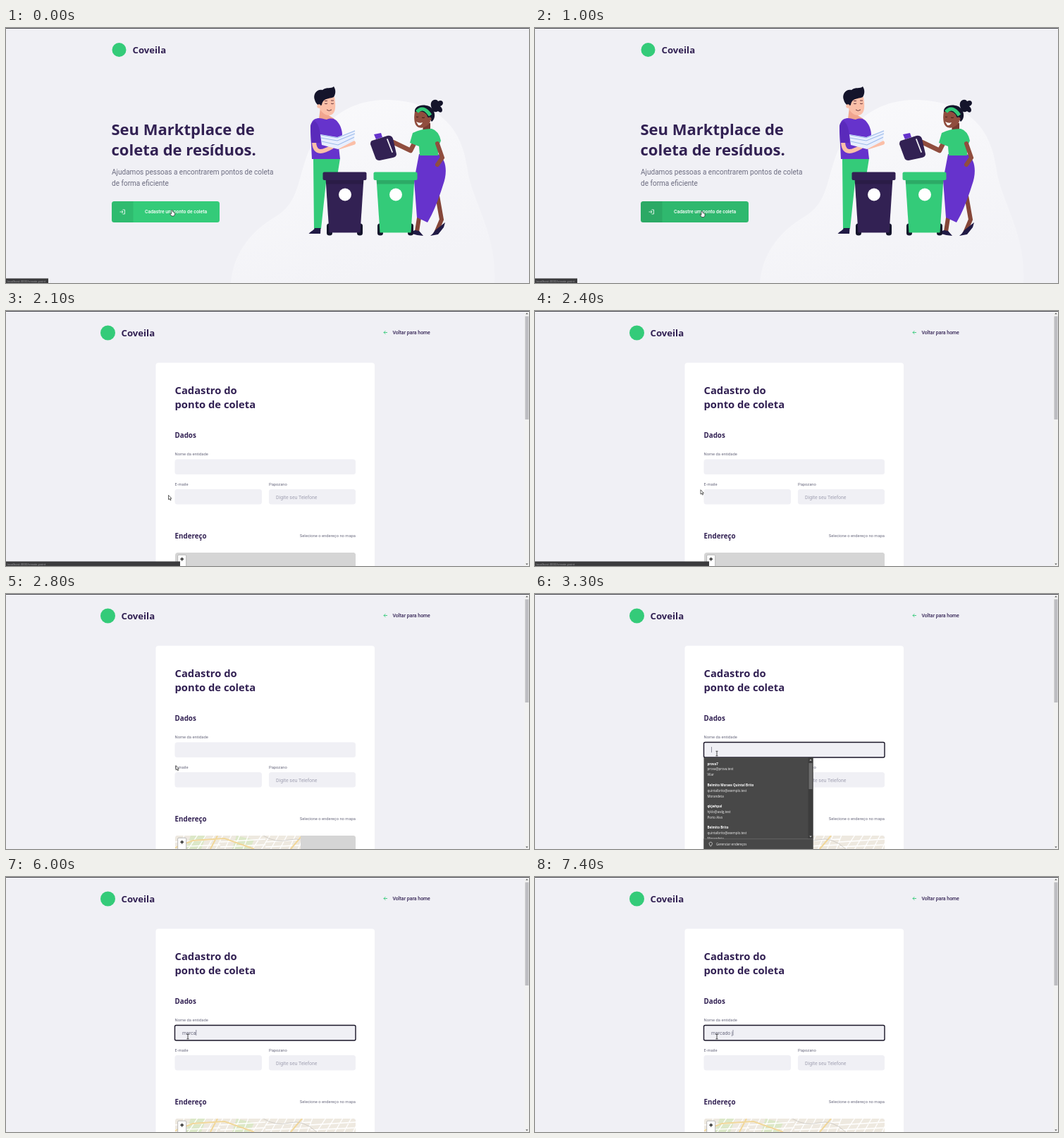
These frames come from a looping animation (742x362 px, 8 s). An HTML page:

```html
<!DOCTYPE html>
<html lang="pt">
<head>
<meta charset="utf-8">
<title>Cadastro</title>
<style>
html, body { margin: 0; width: 100%; height: 100%; overflow: hidden; background: #f0f0f5; }
svg { display: block; width: 100vw; height: 100vh; }
text { font-family: Roboto, sans-serif; fill: #6c6c80; white-space: pre; }
.h { font-family: "Open Sans", sans-serif; font-weight: 700; fill: #322153; }
.logo { font-size: 13.2px; }
.big { font-size: 22px; }
.mid { font-size: 14.75px; }
.sub { font-size: 9.8px; }
.lead { font-size: 10.04px; }
.label { font-size: 5.8px; }
.field { font-size: 6.9px; }
.med { font-weight: 500; }
.tiny text { font-family: "Open Sans", sans-serif; font-size: 4.5px; fill: #f2f2f2; }
.tiny .name { font-weight: 700; fill: #fff; }
</style>
</head>
<body>
<svg viewBox="0 0 742 362" preserveAspectRatio="none">
  <defs>
    <linearGradient id="fade" x1="0" y1="0" x2="0.4" y2="1">
      <stop offset="0" stop-color="#fafafc"/><stop offset="1" stop-color="#f3f3f7"/>
    </linearGradient>
    <clipPath id="mapBox"><path d="M240 362V347q0-4 4-4H492q4 0 4 4V362Z"/></clipPath>
    <g id="wheels" fill="#14142b">
      <rect x="5.5" y="73" width="8" height="17" rx="3.5"/><rect x="48.5" y="73" width="8" height="17" rx="3.5"/>
    </g>
    <g id="bin">
      <path d="M4 9H58L53 86H9Z"/>
      <path d="M4 11H58L57.5 17H4.5Z" fill="#000" opacity=".16"/>
      <rect width="62" height="11.5" rx="2"/>
      <circle cx="31.5" cy="32" r="9" fill="#fff"/>
    </g>
  </defs>
  <rect width="742" height="362" fill="#f0f0f5"/>

  <g id="home">
    <path d="M319 362C322 322 345 290 382 268C414 248 412 224 426 184C446 128 492 100 544 102C614 105 646 142 654 196C660 246 697 290 693 362Z" fill="url(#fade)"/>
    <circle cx="160.5" cy="31" r="10" fill="#34cb79"/>
    <text class="h logo" x="179.5" y="35.5">Coveila</text>
    <text class="h big" x="149.5" y="152">Seu Marktplace de</text>
    <text class="h big" x="149.5" y="181">coleta de resíduos.</text>
    <text class="lead" x="150" y="208">Ajudamos pessoas a encontrarem pontos de coleta</text>
    <text class="lead" x="150" y="224">de forma eficiente</text>
    <rect id="button" x="150" y="246" width="153" height="30" rx="3.5"/>
    <path d="M180.500 246H153.500q-3.500 0-3.500 3.500V272.500q0 3.500 3.500 3.500H180.500Z" opacity=".08"/>
    <path d="M165.500 258H168.500V264H165.500M161.500 261H166M164.300 259.200L166.200 261L164.300 262.800" fill="none" stroke="#fff" stroke-width=".8"/>
    <text class="med" x="197" y="263.300" style="font-size:6.85px;fill:#fff">Cadastre um ponto de coleta</text>

    <!-- man -->
    <path d="M436 185H474L470 210H455L447 285H437Z" fill="#34cb79"/>
    <path d="M429.500 292C433 288 437 287 438 284H446.500L446 292Z" fill="#201a45"/>
    <path d="M446 113H458V124L466 129L455 134L444 129Z" fill="#f0a58e"/>
    <path d="M444 100L466 98C468 110 468 120 462 123C455 126 448 121 445 114Z" fill="#fbbfa8"/>
    <path d="M438 102C435 94 441 86 449 88C455 83 461 87 465 83C469 89 467 95 465 98C458 101 450 99 448 109L445 112C441 108 439 106 438 102Z" fill="#14142b"/>
    <circle cx="444" cy="111" r="2.700" fill="#fbbfa8"/>
    <path d="M452 107q2 1.500 4 0M461 107q2 1.500 4 0M455 116q3 3 7 0M452 103.500h4M461 103h4" fill="none" stroke="#5b2b34" stroke-width=".9"/>
    <path d="M437 130C444 126 449 129 455 130C462 127 468 129 471 134C475 139 477 146 477 152L471 160L474 186H434L432 145Q432 133 437 130Z" fill="#6633cc"/>
    <path d="M437 160C437 178 447 178 462 169M474 169L493 163" fill="none" stroke="#fbbfa8" stroke-width="6" stroke-linecap="round"/>
    <path d="M432 143Q431 134 438 132Q447 139 446 163L433 163Z" fill="#5a2abb"/>
    <path d="M446 151L470 155L495 145L494 160L471 172L448 166Z" fill="#e8efff"/>
    <path d="M447 156L470 160L495 150M448 161L471 166L494 155M447 152L470 156L495 146" fill="none" stroke="#9dbbe9" stroke-width="1.100"/>

    <!-- woman -->
    <path d="M589 250L583 289M612 238L618 272L610 291" fill="none" stroke="#854638" stroke-width="6"/>
    <path d="M572 291Q577 289 580 287L586 288L592 295Q581 294 572 291ZM602 295Q606 292 609 287L623 276L621 283L613 293Z" fill="#201a45"/>
    <path d="M586 179H613C626 187 626 207 620 223C614 242 607 261 598 276L583 269L579 216Z" fill="#6633cc"/>
    <path d="M592 135H602V146L591 149Z" fill="#763b30"/>
    <path d="M580 118Q585 110 598 116L602 133Q596 144 585 141Q577 137 580 118Z" fill="#904d3e"/>
    <path d="M580 119C579 111 590 107 600 111C609 115 611 128 604 133L598 126Q595 116 580 119Z" fill="#14142b"/>
    <path d="M604 114C599 103 610 99 613 104C620 100 623 109 616 111C622 116 618 123 613 118Q607 122 604 114Z" fill="#14142b"/>
    <path d="M583 119Q592 109 602 124" fill="none" stroke="#34cb79" stroke-width="5"/>
    <circle cx="601" cy="129" r="2.500" fill="#904d3e"/>
    <path d="M582 126q2 1 3 0M590 127q2 1 4 0" fill="none" stroke="#341812" stroke-width=".9"/>
    <path d="M582 133q5 3 9 1q-2 5-6 4Z" fill="#fff"/>
    <path d="M582 158L574 174L549 162" fill="none" stroke="#904d3e" stroke-width="6.500" stroke-linecap="round" stroke-linejoin="round"/>
    <path d="M577 149Q588 143 604 143Q614 146 617 160L613 169V181H587L586 168L573 163Z" fill="#34cb79"/>
    <path d="M612 164L619 184L612 194" fill="none" stroke="#904d3e" stroke-width="6" stroke-linecap="round"/>

    <!-- jug and bins -->
    <path d="M522 151L532 149L534 155L525 158Z" fill="#6633cc"/>
    <path d="M519 160L541 153Q547 152 549 157L554 179Q554 183 549 184L530 188Q525 188 524 184L517 165Q517 161 519 160Z" fill="#322153"/>
    <path d="M541 158L548 176" stroke="#f0f0f5" stroke-width="1.800" stroke-linecap="round"/>
    <g transform="translate(449.500 204.500)"><use href="#wheels"/><use href="#bin" fill="#322153"/></g>
    <g transform="translate(521.500 204.500)"><use href="#wheels"/><use href="#bin" fill="#34cb79"/></g>
  </g>

  <g id="form">
    <circle cx="144.500" cy="31" r="10.500" fill="#34cb79"/>
    <text class="h logo" x="163.500" y="35.500">Coveila</text>
    <path d="M541 30.500H536M538.300 28.200L536 30.500L538.300 32.800" fill="none" stroke="#34cb79" stroke-width=".9"/>
    <text class="med" x="548.500" y="33" style="font-size:6.95px;fill:#322153">Voltar para home</text>
    <rect x="212.500" y="73.500" width="310.500" height="300" rx="4" fill="#fff"/>
    <text class="h mid" x="239.500" y="117.500">Cadastro do</text>
    <text class="h mid" x="239.500" y="138">ponto de coleta</text>
    <text class="h sub" x="239.500" y="180">Dados</text>
    <text class="label" x="239.500" y="205.300">Nome da entidade</text>
    <text class="label" x="239.500" y="248">E-maile</text>
    <text class="label" x="373" y="248">Papozano</text>
    <g fill="#f0f0f5">
      <rect x="239.500" y="210.500" width="256.500" height="21.500" rx="3.500"/>
      <rect x="239.500" y="253" width="123.500" height="21.500" rx="3.500"/>
      <rect x="373" y="253" width="123" height="21.500" rx="3.500"/>
    </g>
    <text class="field" x="383" y="266.500" style="fill:#a0a0b2">Digite seu Telefone</text>
    <text class="h sub" x="239.500" y="322.500">Endereço</text>
    <text class="label" x="496" y="321" text-anchor="end">Selecione o endereço no mapa</text>
    <g clip-path="url(#mapBox)">
      <rect x="240" y="343" width="256" height="20" fill="#d5d5d5"/>
      <g id="tiles">
        <rect id="land" x="240" y="343" width="256" height="20" fill="#eee9e0"/>
        <path d="M262 343H284L277 362H255ZM327 343L352 349L346 362H321Z" fill="#dce8c8"/>
        <g fill="none">
          <path id="streets" stroke="#fff" stroke-width="1.300"/>
          <path d="M240 360L265 350L310 347L352 362M300 343L290 362M404 362L420 343" stroke="#f1d79a" stroke-width="2"/>
          <path d="M365 343Q383 354 402 349T441 362" stroke="#c8c5bf" stroke-width=".8"/>
        </g>
      </g>
      <rect id="unloaded" x="418" y="343" width="78" height="20" fill="#d5d5d5"/>
    </g>
    <rect x="243.700" y="346.200" width="12" height="20" rx="1.500" fill="#fff" stroke="#aaa" stroke-width=".8"/>
    <path d="M249.700 349.700V354.700M247.200 352.200H252.200" stroke="#111" stroke-width="1.200"/>

    <rect x="735.500" width="6.500" height="362" fill="#f1f1f1"/>
    <rect x="736.500" y="7.500" width="5" height="146.500" fill="#bdbdc1"/>
    <path d="M737.300 4.500H740.700L739 2.500ZM737.300 358.500H740.700L739 360.500Z" fill="#555"/>

    <rect id="focus" x="239.500" y="210.500" width="256.500" height="21.500" rx="2" fill="none" stroke="#191527" stroke-width="1.400"/>
    <text id="typed" class="field" x="250" y="223.500"></text>
    <rect id="caret" y="217" width=".8" height="8" fill="#77778a"/>

    <g id="menu" class="tiny">
      <rect x="239.500" y="232" width="155" height="130" fill="#484848"/>
      <g id="people"></g>
      <rect x="387.500" y="232" width="7" height="116" fill="#3c3c3c"/>
      <rect x="388.500" y="240" width="5" height="37" fill="#6d6d6d"/>
      <path d="M389.300 236.500H392.700L391 234.500ZM389.300 343.500H392.700L391 345.500Z" fill="#ccc"/>
      <rect x="239.500" y="347.500" width="155" height="15" fill="#484848"/>
      <path d="M239.500 347.700H394.500" stroke="#777" stroke-width=".6"/>
      <path d="M249.300 358.300C246 354.500 247 352.300 249.300 352.300S252.600 354.500 249.300 358.300Z" fill="none" stroke="#ddd" stroke-width=".8"/>
      <text x="257" y="357">Gerenciar endereços</text>
    </g>
  </g>

  <rect width="742" height="1" fill="#4a4a50"/>
  <g id="status" class="tiny">
    <rect id="bar" y="355.500" height="7" fill="#3b3b3d"/>
    <text x="1.500" y="360.600" style="font-size:4.300px;fill:#a5a5a8">localhost:3000/create-point</text>
  </g>

  <g id="pointer">
    <path id="hand" d="M-1 3V-2Q0-3 1-2V0L4 1V4L2.500 6H-.5L-3 2.500L-2 2Z" fill="#fff" stroke="#222" stroke-width=".7"/>
    <path id="arrow" d="M0 0V6.300L1.500 5L2.600 7.300L3.600 6.800L2.500 4.600H4.400Z" fill="#fff" stroke="#222" stroke-width=".7"/>
    <path id="beam" d="M-1.500-3.300H1.500M0-3.300V3.300M-1.500 3.300H1.500" fill="none" stroke="#222" stroke-width=".8"/>
  </g>
</svg>
<script>
const el = id => document.getElementById(id);
const show = (id, on) => el(id).setAttribute("visibility", on ? "inherit" : "hidden");
const clamp = x => Math.min(1, Math.max(0, x));

const people = [
  ["prova7", "prova@prova.test", "Vilar"],
  ["Belmito Moraes Quintal Brito", "quintalbrito@exemplo.test", "Morandeta"],
  ["qkjwhpal", "hjklo@asdg.test", "Porto Alvo"],
  ["Belmito Brito", "quintalbrito@exemplo.test", "Morandeta"],
];
el("people").innerHTML = people.map((lines, i) => lines.map((s, j) =>
  `<text x="244.500" y="${242.500 + i * 30.200 + j * 7.900}"${j ? "" : ' class="name"'}>${s}</text>`
).join("")).join("");

let streets = "";
for (let x = 232; x < 510; x += 13) streets += `M${x} 363l${8 + x % 7} -21`;
for (let x = 240; x < 500; x += 64) streets += `M${x} 352l64 -4M${x} 359l64 -3`;
el("streets").setAttribute("d", streets);

// [time, x, y] of the mouse
const path = [[0, 235.500, 261], [900, 235.500, 261], [1000, 237, 262.500], [2000, 237, 263],
  [2100, 230.500, 261.500], [2800, 241, 243.500], [3100, 258, 226.500], [8000, 258, 226.500]];
// [time, text] in the first field
const typing = [[0, ""], [5200, "m"], [5300, "ma"], [5400, "mar"], [5500, "marc"], [6000, "marca"],
  [6900, "marcad"], [7100, "marcado"], [7300, "marcado "], [7400, "marcado j"]];

function mouseAt(t) {
  const i = path.findIndex(p => p[0] > t);
  const [a, b] = [path[i - 1], path[i]];
  const k = (t - a[0]) / (b[0] - a[0]);
  return [1, 2].map(n => a[n] + (b[n] - a[n]) * k);
}

function draw(now) {
  const t = Math.floor(now % 8000 / 100) * 100;
  const onForm = t >= 2100;
  show("home", !onForm);
  show("form", onForm);

  const k = clamp(t / 300);
  const mix = (a, b) => Math.round(a + (b - a) * k);
  el("button").setAttribute("fill", `rgb(${mix(52, 47)},${mix(203, 184)},${mix(121, 110)})`);

  show("status", t < 2800);
  el("bar").setAttribute("width", t < 1500 ? 60 : 247);

  show("tiles", t >= 2500);
  show("unloaded", t < 2900);
  const focused = t >= 3200;
  show("focus", focused);
  show("menu", t >= 3300 && t < 5400);

  const text = typing.filter(p => p[0] <= t).pop()[1];
  el("typed").textContent = text;
  el("caret").setAttribute("x", 250 + (text ? el("typed").getComputedTextLength() : 0));
  const blinkedOff = t >= 3800 && t < 4400 || t >= 4900 && t < 5200;
  show("caret", focused && !blinkedOff);

  el("pointer").setAttribute("transform", `translate(${mouseAt(t)})`);
  show("hand", !onForm);
  show("arrow", onForm && t < 3000);
  show("beam", t >= 3000);
  requestAnimationFrame(draw);
}
requestAnimationFrame(draw);
</script>
</body>
</html>
```
